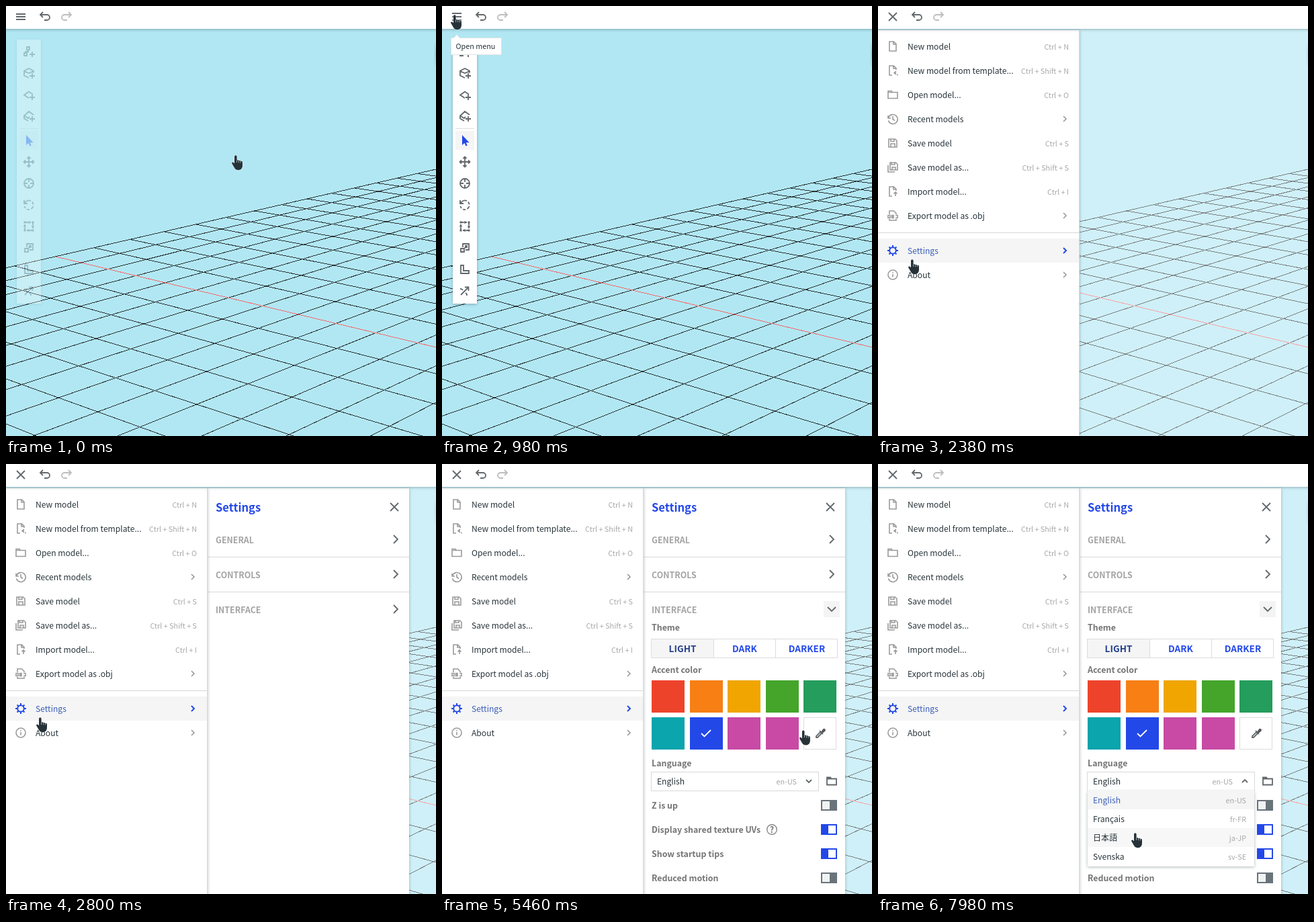
Animation, 640 px wide and 640 px high, one loop 8000 ms. Source, as an HTML page:

```html
<!DOCTYPE html>
<html lang="en">
<head>
<meta charset="utf-8">
<title>Settings walkthrough</title>
<style>
html, body { margin: 0; width: 100%; height: 100%; overflow: hidden; background: #fff; }
svg { display: block; width: 100vw; height: 100vh; }
text { font-family: "Noto Sans CJK JP", "Noto Sans CJK", "Noto Sans", sans-serif; font-size: 12.1px; fill: #263238; }
.small { font-size: 10.8px; }
.pale { fill: #a8a8a8; }
.end { text-anchor: end; }
.mid { text-anchor: middle; }
.bold { font-weight: bold; font-size: 12.4px; fill: #757575; }
.head { fill: #a3a3a3; }
.tab { font-size: 13.6px; fill: #2348e8; text-anchor: middle; }
.ico { fill: none; stroke: #62686c; stroke-width: 1.8; }
.row .ico { stroke: #9a9a9a; stroke-width: 1.6; }
.row .bg { fill: none; }
.row.on .bg { fill: #f5f5f5; }
.row.on .ico { stroke: #2348e8; stroke-width: 2; }
.row.on .name { fill: #3c5fb8; }
</style>
</head>
<body>
<svg id="stage" viewBox="0 0 640 640"></svg>
<script>
const LOOP = 8000, BLUE = '#2348e8';
const stage = document.getElementById('stage');
const clamp = v => Math.max(0, Math.min(1, v));
const ramp = (t, a, b) => clamp((t - a) / (b - a));
const easeOut = p => 1 - (1 - p) ** 3;
const ease = p => p * p * (3 - 2 * p);

const rect = (x, y, w, h, fill, more = '') =>
  `<rect x="${x}" y="${y}" width="${w}" height="${h}" fill="${fill}" ${more}/>`;
const text = (x, y, s, cls = '') => `<text x="${x}" y="${y}" class="${cls}">${s}</text>`;
const icon = (x, y, d, more = '', flip = 1) =>
  `<path class="ico" transform="translate(${x} ${y}) scale(${flip} 1)" d="${d}" ${more}/>`;
const cross = 'M-6 -6L6 6M6 -6L-6 6';
const right = 'M-2 -4l4 4-4 4';
const folder = 'M-7 -5.5h5l1.5 2h7.5v9h-14zM-7 -3.5h6';

// Ground grid in perspective: corner plus two vanishing points
function gridPoint(i, j) {
  const a = 0.033 * i, b = -0.02165 * j, w = 1 + a + b;
  const x = (73.6 + 1866 * a - 1651.6 * b) / w;
  const y = (372.9 - 38.3 * a - 38.3 * b) / w;
  return x.toFixed(1) + ' ' + y.toFixed(1);
}
function grid() {
  let d = '';
  for (let i = -7; i <= 16; i++) if (i) d += `M${gridPoint(i, 0)}L${gridPoint(i, 15)}`;
  for (let j = 0; j <= 15; j++) d += `M${gridPoint(-7, j)}L${gridPoint(16, j)}`;
  return `<g fill="none" shape-rendering="crispEdges"><path d="${d}" stroke="#2a3235"/>
    <path d="M${gridPoint(0, 0)}L${gridPoint(0, 15)}" stroke="#f76a6a"/></g>`;
}

const plus = 'M1 4h8M5 0v8';
const tools = [
  [68, 'M-3 -7h4v4h-4zM-7 2h4v4h-4zM-1 -3v3h-4v2' + plus],
  [100, 'M0 7l-7 -3.5v-7l7 -3.5 7 3.5v3M-7 -3l7 3 7 -3' + plus],
  [132, 'M0 5l-7 -4.5 7 -5 6 4' + plus],
  [164, 'M-1 7l-6 -3.5v-4l7 -6.5 7 5M-7 -.5l6 3.5 2 -2' + plus],
  [232, 'M-7 0h14M0 -7v14M-2.5 -5l2.5 -2.5 2.5 2.5M-2.5 5l2.5 2.5 2.5 -2.5M-5 -2.5l-2.5 2.5 2.5 2.5M5 -2.5l2.5 2.5 -2.5 2.5'],
  [264, 'M7 0a7 7 0 1 1 -14 0a7 7 0 1 1 14 0M0 -7v5M0 2v5M-7 0h5M2 0h5'],
  [296, 'M-7 -7v5h5M-6 -3a7 7 0 0 1 9 -3M5 -4.5a7 7 0 0 1 1.5 4M6.5 2a7 7 0 0 1 -3 4M1 7a7 7 0 0 1 -4 -.5M-5 5a7 7 0 0 1 -1.5 -3'],
  [328, 'M-6 -6h12v12h-12z', 'stroke-dasharray="4 2 3 3"'],
  [360, 'M-3 -1v-5h9v9h-5M-6 1h5v5h-5zM-1 1l4 -4M0 -3h3v3'],
  [392, 'M-6 -6h4v8h8v4h-12z'],
  [424, 'M-6 6l11 -11M0 -5.5h5.5v5.5M-7 -3a4 4 0 0 1 4 2M1 3a4 4 0 0 1 2 4']
];
const dots = [-6, 0, 6].flatMap(a => [-6, 0, 6].map(b => a || b ? rect(32.5 + a, 326.5 + b, 3, 3, '#62686c') : ''));
const toolbar = () => `<g id="tools">${rect(16, 50, 36, 393, '#fff', 'filter="url(#soft)"')}
  ${rect(20, 186, 28, 28, '#f5f5f5')}${rect(20, 182, 28, 1, '#ddd')}
  <path d="M30 192v15l3.5 -3 2 4.500 2.200 -1 -2 -4.200h4.800z" fill="${BLUE}"/>
  ${tools.map(([y, d, more]) => icon(34, y, d, more)).join('')}${dots.join('')}</g>`;

const doc = 'M-5 -7h6.5l3.5 3.5v10.5h-10zM1 -7v4h4';
const openDoc = 'M5 -1v-2.5l-3.5 -3.5h-6.5v14h4M1 -7v4h4';
const disk = 'M-6 -6h9.5l2.5 2.5v9.5h-12zM-3 -6v3.5h5v-3.5M-3 6v-5h6v5';
const items = [
  [60, 'New model', 'Ctrl + N', doc],
  [96, 'New model from template...', 'Ctrl + Shift + N', openDoc + 'M5 1l-3 2.5 3 2.5M2 3.5h3M6 6.5h2'],
  [132, 'Open model...', 'Ctrl + O', folder],
  [168, 'Recent models', '', 'M-7 -5v4h4M-6.5 -1.5a7 7 0 1 1 0 4M0 -4v4.5l3 2'],
  [204, 'Save model', 'Ctrl + S', disk],
  [240, 'Save model as...', 'Ctrl + Shift + S', 'M-4 -7h8.5l2.5 2.5v8.5h-11zM-2 -7v3h5v-3M-1 4v-4h5v4M-7 -3v10h10'],
  [276, 'Import model...', 'Ctrl + I', openDoc + 'M4 7v-6M1.5 3.5l2.5 -2.5 2.5 2.5'],
  [312, 'Export model as .obj', '', 'M-5 -2v-5h6.5l3.5 3.5v1.5M-5 5v2h10v-2M-7 -.5h3v4h-3zM-1.5 -.5h2.5v4h-2.5zM-1.5 1.5h2.5M4 -.5h3v4h-3'],
  [364, 'Settings', '', 'M4.8 0a4.8 4.8 0 1 1 -9.6 0a4.8 4.8 0 1 1 9.6 0M0 -5v-3M0 5v3M-5 0h-3M5 0h3M3.5 -3.5l2 -2M-3.5 3.5l-2 2M-3.5 -3.5l-2 -2M3.5 3.5l2 2'],
  [400, 'About', '', 'M7 0a7 7 0 1 1 -14 0a7 7 0 1 1 14 0M0 -1v4.5M0 -4v1.6']
];
const menu = () => `<g id="menu">${rect(0, 36, 300, 640, '#fff', 'filter="url(#soft)"')}
  ${items.map(([y, name, keys, d]) => `<g class="row"><rect class="bg" y="${y - 18}" width="299" height="36"/>
    ${icon(22, y, d)}${text(44, y + 5, name, 'name')}
    ${keys ? text(284, y + 5, keys, 'small pale end') : icon(278, y, right)}</g>`).join('')}
  ${rect(0, 337, 299, 1, '#d6d6d6')}${rect(299, 36, 1, 604, '#d9dcde')}</g>`;

const hues = ['#ee432b', '#f77f14', '#f0a500', '#44a52a', '#259d5c', '#0aa5ad', BLUE, '#c84aa5', '#c84aa5'];
const cell = k => [Math.round(312 + (k % 5) * 56.5), k < 5 ? 322 : 377];
const toggle = (y, on) => rect(564, y, 24, 16, on ? BLUE : '#69737a') + rect(on ? 575 : 566, y + 2, 11, 12, on ? '#fff' : '#f1f3f3');
const option = (y, name, code) => text(320, y, name) + text(548, y, code, 'small pale end');

const details = () => `<g id="details" clip-path="url(#reveal)">
  ${text(312, 248, 'Theme', 'bold')}
  ${rect(311.5, 260.5, 277, 28, '#fff', 'stroke="#dcdcdc"')}${rect(312, 261, 92, 27, '#f5f5f5')}
  ${rect(404, 261, 1, 27, '#dcdcdc')}${rect(496, 261, 1, 27, '#dcdcdc')}
  ${text(358, 280, '<tspan fill="#24408e">LIGHT</tspan>', 'bold tab')}${text(450.5, 280, 'DARK', 'bold tab')}${text(543, 280, 'DARKER', 'bold tab')}
  ${text(312, 311, 'Accent color', 'bold')}
  ${hues.map((c, k) => rect(...cell(k), 49, 48, c)).join('')}
  ${icon(393, 401, 'M-7 0l4.5 4.5L7 -5', 'style="stroke:#fff"')}
  ${rect(538.5, 377.5, 48, 47, '#fff', 'stroke="#dcdcdc"')}
  ${icon(563, 401, 'M-6 6v-2l6 -6 2 2 -6 6zM-1 -4l5 5')}<path d="M564 399l3 -4.5q2 -1.5 3.3 0t0 3.3l-4 3z" fill="#555"/>
  ${text(312, 450, 'Language', 'bold')}
  ${rect(311.5, 458.5, 249, 28, '#fff', 'stroke="#d9d9d9"')}
  ${text(320, 477, 'English')}${text(528, 477, 'en-US', 'small pale end')}
  <path id="arrow" class="ico" d="M-4 -2l4 4 4 -4"/>${icon(580, 472, folder)}
  ${['Z is up', 'Display shared texture UVs', 'Show startup tips', 'Reduced motion']
    .map((s, k) => text(312, 513 + 36 * k, s, 'bold') + toggle(500 + 36 * k, k === 1 || k === 2)).join('')}
  <circle cx="491" cy="544" r="7.3" class="ico" style="stroke:#888;stroke-width:1.4"/>${text(491, 548.5, '?', 'bold mid')}
  <g id="list">${rect(312, 487, 248, 112, '#fff', 'filter="url(#soft)"')}${rect(312, 486, 248, 28, '#f5f5f5')}
    <rect id="hover" x="312" width="248" height="28" fill="#f7f7f7"/>
    ${option(505, '<tspan fill="#3c5fb8">English</tspan>', 'en-US')}${option(533, 'Français', 'fr-FR')}
    ${option(561, '日本語', 'ja-JP')}${option(589, 'Svenska', 'sv-SE')}</g></g>`;

const settings = () => `<g id="settings">${rect(300, 36, 300, 640, '#fff', 'filter="url(#soft)"')}
  <text x="312" y="71" class="bold" style="font-size:16.6px;fill:${BLUE}">Settings</text>
  ${icon(578, 64, cross)}
  ${['GENERAL', 'CONTROLS', 'INTERFACE'].map((s, k) => text(312, 118 + 52 * k, s, 'bold head')).join('')}
  ${rect(300, 138, 300, 1, '#d9d9d9')}${rect(300, 190, 300, 1, '#d9d9d9')}
  <rect id="focus" x="568" y="204" width="24" height="24" fill="#f4f4f4"/>
  ${[112, 164].map(y => icon(580, y, 'M-3 -6l6 6 -6 6')).join('')}
  <path id="fold" class="ico" d="M-3 -6l6 6 -6 6"/>${details()}</g>`;

const undo = 'M-3 -7l-4 4 4 4M-7 -3h10a4 4 0 0 1 0 8h-4';
const header = () => `${rect(-10, -10, 660, 44, '#fff', 'filter="url(#soft)"')}
  <path id="burger" class="ico"/>${icon(58, 16, undo)}
  ${icon(90, 16, undo, 'style="stroke:#bdbdbd"', -1)}`;

stage.innerHTML = `<defs>
  <filter id="soft" x="-20%" y="-20%" width="140%" height="140%"><feDropShadow dx="0" dy="1" stdDeviation="2" flood-color="#30444c" flood-opacity=".4"/></filter>
  <clipPath id="reveal"><rect id="window" x="300" y="229" width="300" height="420"/></clipPath></defs>
  ${rect(0, 0, 640, 640, '#b1e7f3')}${grid()}
  ${rect(637, 54, 20, 37, '#a9dde8', 'rx="6"')}<path d="M640.5 59q-2.5 12 0 24" fill="none" stroke="#d58f92" stroke-opacity=".6"/>
  ${toolbar()}<rect id="veil" y="34" width="640" height="606" fill="#fff"/>
  ${settings()}${menu()}${header()}
  <g id="tip"><path d="M13.5 47.5h4l4.5 -5 4.5 5h62v25h-75z" fill="#fff" stroke="#dfe3e5"/>
    <text id="label" x="50" y="64" class="small mid"></text></g>
  <g id="hand"><path d="M-4.5 -8.5a1.7 1.7 0 0 1 3.4 0V-3c.8-.8 2.4-.6 2.8.5c.9-.7 2.2-.4 2.6.7c1-.6 2.5 0 2.5 1.6V4c0 4-2 6.5-6 6.5c-3.5 0-4.6-1.6-5.8-3.8L-8 1.5c-.8-1.6 1-2.8 2.2-1.6L-4.5 1.4z" fill="#263238" stroke="#fff" stroke-opacity=".75" paint-order="stroke"/>
    <path d="M-1.1 -3v3M1.7 -2.5v2.7M4.3 -1.8v2.3" stroke="#b9c4c9" stroke-width=".8"/></g>`;

const el = {};
stage.querySelectorAll('[id]').forEach(n => { el[n.id] = n; });
const rows = [...stage.querySelectorAll('.row')];
const set = (id, name, v) => el[id].setAttribute(name, v);
const show = (id, p) => { set(id, 'opacity', p); set(id, 'display', p > 0 ? 'inline' : 'none'); };

// Pointer stops: time, x, y
const path = [
  [0, 344, 233], [120, 344, 233], [800, 21, 24], [1050, 21, 24], [1400, 21, 27], [1780, 21, 27],
  [2350, 53, 388], [2800, 53, 388], [3850, 581, 218], [4880, 581, 218], [5460, 540, 407],
  [5880, 470, 476], [6350, 470, 476], [7300, 387, 563], [7770, 387, 563], [7950, 385, 560], [8000, 385, 560]
];
const slope = (k, c) => {
  const a = path[k], b = path[k + 1];
  return a && b ? (b[c] - a[c]) / (b[0] - a[0]) : 0;
};
const tangent = (k, c) => {
  const a = slope(k - 1, c), b = slope(k, c);
  return a * b > 0 ? (a + b) / 2 : 0;
};
function pointer(t) {
  let k = 0;
  while (k < path.length - 2 && t >= path[k + 1][0]) k++;
  const a = path[k], b = path[k + 1], h = b[0] - a[0], u = (t - a[0]) / h;
  return [1, 2].map(c => a[c] + (b[c] - a[c]) * ease(u)
    + h * u * (1 - u) * ((1 - u) * tangent(k, c) - u * tangent(k + 1, c)));
}

function draw(t) {
  const [x, y] = pointer(t), tipY = y - 9;
  set('hand', 'transform', `translate(${(x + 0.8).toFixed(2)} ${y.toFixed(2)}) scale(1.06)`);
  set('tools', 'opacity', 0.3 + 0.7 * ramp(t, 0, 480));

  const m = easeOut(ramp(t, 1070, 1330));
  set('menu', 'transform', `translate(${-310 * (1 - m)} 0)`);
  set('veil', 'opacity', 0.38 * m);
  const gap = 4 + ramp(t, 800, 880);
  const mix = (p, q) => (p + (q - p) * m).toFixed(2);
  set('burger', 'd', `M${mix(15, 16)} ${mix(16 - gap, 10)}L${mix(29, 28)} ${mix(16 - gap, 22)}`
    + `M${mix(15, 16)} ${mix(16 + gap, 22)}L${mix(29, 28)} ${mix(16 + gap, 10)}` + (m < 0.5 ? 'M15 16H29' : ''));

  show('tip', ramp(t, 830, 900) * (1 - ramp(t, 1830, 1930)));
  el.label.textContent = t < 1100 ? 'Open menu' : 'Close menu';

  const over = t > 1850 && t < 3300 && x < 299;
  rows.forEach((r, k) => {
    const on = (over && Math.abs(tipY - items[k][0]) <= 18) || (k === 8 && t > 2480);
    r.setAttribute('class', on ? 'row on' : 'row');
  });

  const s = easeOut(ramp(t, 2500, 2800));
  show('settings', s > 0 ? 1 : 0);
  set('settings', 'transform', `translate(${-300 * (1 - s)} 0)`);
  set('focus', 'opacity', ramp(t, 3930, 4030));

  const f = ease(ramp(t, 4250, 4560));
  set('fold', 'transform', `translate(580 216) rotate(${90 * f})`);
  show('details', f);
  set('window', 'height', 420 * f);

  const d = easeOut(ramp(t, 6020, 6200));
  show('list', d);
  set('arrow', 'transform', `translate(546 472) scale(1 ${1 - 2 * d})`);
  const pick = Math.floor((tipY - 486) / 28);
  show('hover', d && pick > 0 ? 1 : 0);
  set('hover', 'y', 486 + 28 * pick);
}

const start = performance.now();
function tick() {
  draw((performance.now() - start) % LOOP);
  requestAnimationFrame(tick);
}
draw(0);
requestAnimationFrame(tick);
</script>
</body>
</html>
```
